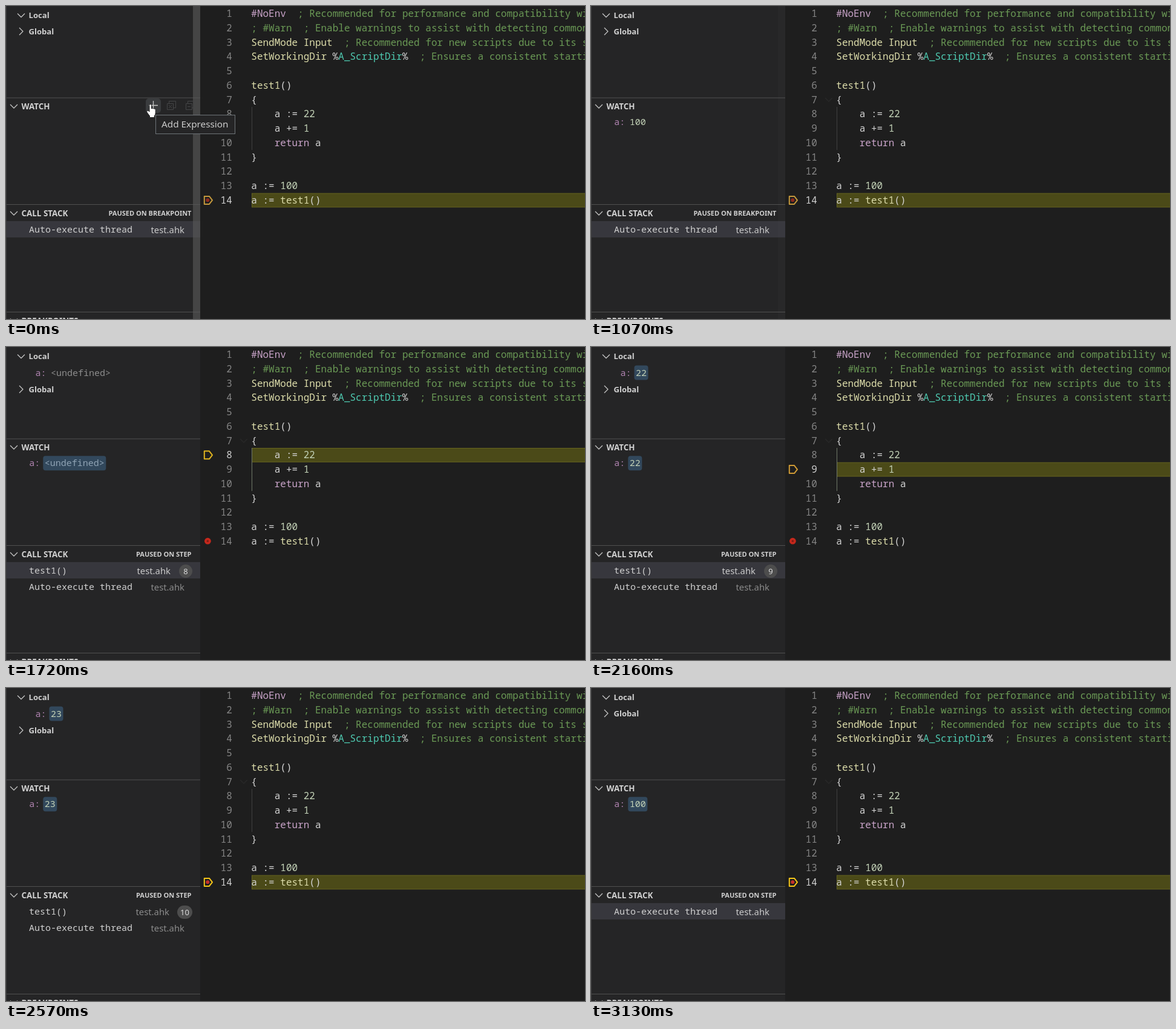
Animation, 957 px wide and 518 px high, one loop 3.33 s. Source, as an HTML page:

```html
<!DOCTYPE html>
<html lang="en">
<head>
<meta charset="utf-8">
<title>Debugger watch</title>
<style>
  html, body { margin: 0; width: 100%; height: 100%; overflow: hidden; background: #1e1e1e; }
  svg { display: block; width: 957px; height: 518px; }
  text { white-space: pre; fill: #ccc; }
  .code { font: 16px "Noto Sans Mono", "DejaVu Sans Mono", monospace; }
  .mono { font: 15px "Noto Sans Mono", "DejaVu Sans Mono", monospace; }
  .ui { font: 14.8px "Noto Sans", "Open Sans", sans-serif; }
  .tip { font: 15.3px "Noto Sans", "Open Sans", sans-serif; }
  .badge { font: 13px "Noto Sans", "Open Sans", sans-serif; }
  .head { font: bold 13.4px "Noto Sans", "Open Sans", sans-serif; }
  .row { font: bold 13.1px "Noto Sans", "Open Sans", sans-serif; }
  .status { font: bold 11px "Noto Sans", "Open Sans", sans-serif; }
</style>
</head>
<body>
<svg id="stage" viewBox="0 0 957 518" xmlns="http://www.w3.org/2000/svg">
  <g id="panels"></g>
  <g id="live"></g>
  <rect id="bar" x="309" y="0" width="12" height="518" fill="#5a5a5a" opacity="0"/>
  <g id="over"></g>
</svg>
<script>
(() => {
const LOOP = 3330;
const PITCH = 23.77;
const $ = id => document.getElementById(id);

// Each step overrides the fields of the state before it.
const steps = [
  { t: 0, line: 14, stack: 0, picked: true, status: 'BREAKPOINT', gold: '#c4983c', dot: '#8e2a1e',
    local: '', localLit: false, watch: '', watchLit: false, input: null, tip: true, pointer: 'hand', fold: false },
  { t: 70, tip: false },
  { t: 140, input: '' },
  { t: 530, input: 'a' },
  { t: 670, input: null, watch: '100' },
  { t: 930, pointer: [400, 105], fold: true },
  { t: 1000, pointer: [529, 26] },
  { t: 1070, pointer: null },
  { t: 1370, line: 8, gold: '#dfb31f' },
  { t: 1440, stack: 8, status: 'STEP' },
  { t: 1580, local: '<undefined>' },
  { t: 1650, watch: '<undefined>', watchLit: true },
  { t: 1920, line: 9, gold: '#cf9a35' },
  { t: 1990, stack: 9 },
  { t: 2060, local: '22', localLit: true, watch: '22' },
  { t: 2230, line: 10, gold: '#dc9a1c' },
  { t: 2300, stack: 10, picked: false },
  { t: 2370, local: '23', watch: '23' },
  { t: 2570, line: 14, gold: '#f5c518', dot: '#c4302b' },
  { t: 2640, stack: 0, picked: true },
  { t: 2710, localLit: false, watchLit: false },
  { t: 2920, local: '' },
  { t: 2990, watch: '100', watchLit: true },
  { t: 3060, pointer: [533, -4] },
  { t: 3130, pointer: null }
];
steps.forEach((s, i) => { if (i) steps[i] = { ...steps[i - 1], ...s }; });

const C = { text: '#d4d4d4', fn: '#dcdcaa', note: '#6a9955', key: '#c8a3c8', num: '#c3d2b7', type: '#4ec9b0' };
const code = [
  [['key', '#NoEnv'], ['note', '  ; Recommended for performance and compatibility with']],
  [['note', '; #Warn  ; Enable warnings to assist with detecting common']],
  [['fn', 'SendMode Input'], ['note', '  ; Recommended for new scripts due to its superior']],
  [['fn', 'SetWorkingDir '], ['text', '%'], ['type', 'A_ScriptDir'], ['text', '%'], ['note', '  ; Ensures a consistent starting']],
  [],
  [['fn', 'test1'], ['text', '()']],
  [['text', '{']],
  [['text', '    a := '], ['num', '22']],
  [['text', '    a += '], ['num', '1']],
  [['key', '    return'], ['text', ' a']],
  [['text', '}']],
  [],
  [['text', 'a := '], ['num', '100']],
  [['text', 'a := '], ['fn', 'test1'], ['text', '()']]
];

const esc = s => String(s).replace(/&/g, '&amp;').replace(/</g, '&lt;');
const text = (cls, x, y, str, fill = '#ccc', anchor = 'start') =>
  `<text class="${cls}" x="${x}" y="${y}" style="fill:${fill}" text-anchor="${anchor}">${esc(str)}</text>`;
const rect = (x, y, w, h, fill, more = '') =>
  `<rect x="${x}" y="${y}" width="${w}" height="${h}" fill="${fill}" ${more}/>`;
const path = (d, stroke, width = 1, fill = 'none') =>
  `<path d="${d}" fill="${fill}" stroke="${stroke}" stroke-width="${width}" stroke-linejoin="round"/>`;
const chevron = (x, y, open = true, color = '#c5c5c5') =>
  path(open ? `M${x - 6} ${y - 3}l6 6 6-6` : `M${x - 3} ${y - 6}l6 6-6 6`, color, 1.3);
const lineTop = n => 0.6 + PITCH * (n - 1);

function panels() {
  let s = rect(0, 0, 957, 518, '#1e1e1e') + rect(0, 0, 321, 518, '#252526') + rect(0, 0, 1, 518, '#3a3a3b');
  for (const y of [151.5, 328, 506]) s += rect(1, y, 320, 1, '#505050');
  for (const [label, y] of [['WATCH', 166], ['CALL STACK', 343], ['BREAKPOINTS', 520.5]])
    s += chevron(13, y) + text('head', 25.5, y + 5, label, '#d0d0d0');
  return s + chevron(25, 15.5) + text('row', 37.5, 20, 'Local', '#d0d0d0');
}

function variable(x, mid, value, lit) {
  if (!value) return '';
  const vague = value[0] === '<';
  const color = vague ? (lit ? '#8fa3b4' : '#8c8c8c') : '#c3d2b7';
  const box = lit ? rect(x + 23, mid - 12, value.length * 9 + 5, 24, '#32485c', 'rx="4"') : '';
  return box + text('mono', x, mid + 5, 'a:', '#b184b1') + text('mono', x + 25.4, mid + 5, value, color);
}

function callStack(s) {
  let out = text('status', 306.5, 347, 'PAUSED ON ' + s.status, '#d0d0d0', 'end');
  if (s.picked) out += rect(1, 356, 320, 27, '#37373d');
  const bright = s.picked ? '#ccc' : '#8b8b8b';
  if (s.stack) {
    const wide = s.stack > 9;
    const x = wide ? 283 : 286;
    const w = wide ? 25 : 22;
    out += text('mono', 38, 375, 'test1()', '#d0d0d0') +
      text('ui', wide ? 214.5 : 216.5, 375.5, 'test.ahk', bright) +
      rect(x, 360, w, 22, '#4d4d4d', 'rx="11"') +
      text('badge', x + w / 2, 376, s.stack, '#ddd', 'middle');
  }
  const y = s.stack ? 402 : 375;
  return out + text('mono', 38, y, 'Auto-execute thread', '#d0d0d0') +
    text('ui', 239.5, y + 0.5, 'test.ahk', s.stack ? '#8b8b8b' : bright);
}

function editor(s) {
  const y = lineTop(s.line);
  let out = rect(406.5, y + 0.5, 560, PITCH - 1, '#4b4a18', 'stroke="#66651f"');
  out += rect(406, lineTop(8), 1, PITCH * 3, s.line === 14 ? '#404040' : '#707868');
  code.forEach((parts, i) => {
    const base = 18 + PITCH * i;
    out += text('code', 373.8, base, i + 1, i + 1 === s.line ? '#d0d0d0' : '#858585', 'end');
    out += `<text class="code" x="405.3" y="${base}">` +
      parts.map(([c, str]) => `<tspan style="fill:${C[c]}">${esc(str)}</tspan>`).join('') + '</text>';
  });
  if (s.line === 14) out += `<circle cx="333.3" cy="321.2" r="3" fill="${s.dot}"/>`;
  else out += '<circle cx="333.4" cy="321.2" r="5.4" fill="#c4281c"/><circle cx="333.4" cy="321.2" r="1.6" fill="#7a1a14"/>';
  out += path(`M327.8 ${y + 5.3}h8.2l5 6.5-5 6.5h-8.2z`, s.gold, 2);
  return s.fold ? out + chevron(393, 155, true, '#292929') : out;
}

function actions() {
  return rect(231, 153, 25, 24, '#3a3c3e', 'rx="5"') +
    path('M243.5 157v15M236 164.5h15', '#c5c5c5', 1.3) +
    path('M269.5 161v-3.5h11v11H277M266.5 161.5h10v10h-10zM269 164l5 5m0-5l-5 5', '#444546') +
    path('M300.5 161v-3.5h11v11H308M297.5 161.5h10v10h-10zM300 166.5h5', '#444546');
}

function inputBox(value) {
  return rect(39.5, 178.5, 281, 27, '#3c3c3c', 'stroke="#007fd4"') +
    (value ? text('ui', 44, 197.5, value) : text('ui', 44, 197.5, 'Expression to watch', '#858585')) +
    rect(value ? 53 : 43, 184, 1, 17, '#aeafad');
}

function pointer(p) {
  if (!p) return '';
  if (p === 'hand')
    return path('M237 175V164.5q0-2 1.7-2t1.7 2V170q.8-1.5 2.2-.2 1.2-1 2.2.3 2.2-.6 2.4 1.5V177q0 3-2 5v2.5H237.5V182L233 176q-1-2.5 1-3 1.5 0 3 2z', '#222', 1, '#fff');
  return `<g transform="translate(${p[0]} ${p[1]})">` +
    path('M.5.5v16.5l4-3.7 2.6 5.7 2.3-1-2.6-5.6h5z', '#222', 1, '#fff') + '</g>';
}

function draw(s) {
  const globalY = s.local ? 70 : 42;
  $('live').innerHTML = editor(s) + variable(48.5, 42.5, s.local, s.localLit) +
    chevron(25, globalY, false) + text('row', 37.5, globalY + 5, 'Global', '#d0d0d0') +
    variable(38.3, 192.3, s.watch, s.watchLit) + callStack(s);
  let over = s.pointer === 'hand' ? actions() : '';
  if (s.input !== null) over += inputBox(s.input);
  if (s.tip) over += rect(247.5, 180.5, 131, 31, '#252526', 'stroke="#6e7478"') + text('tip', 257, 201, 'Add Expression');
  $('over').innerHTML = over + pointer(s.pointer);
}

$('panels').innerHTML = panels();
const start = performance.now();
let shown = null;

function tick(now) {
  const t = Math.max(0, now - start) % LOOP;
  const s = steps.findLast(step => step.t <= t);
  if (s !== shown) draw(shown = s);
  const fade = Math.min(1, Math.max(0, (1170 - t) / 1100));
  $('bar').setAttribute('opacity', 0.62 * fade);
  requestAnimationFrame(tick);
}
tick(start);
})();
</script>
</body>
</html>
```
